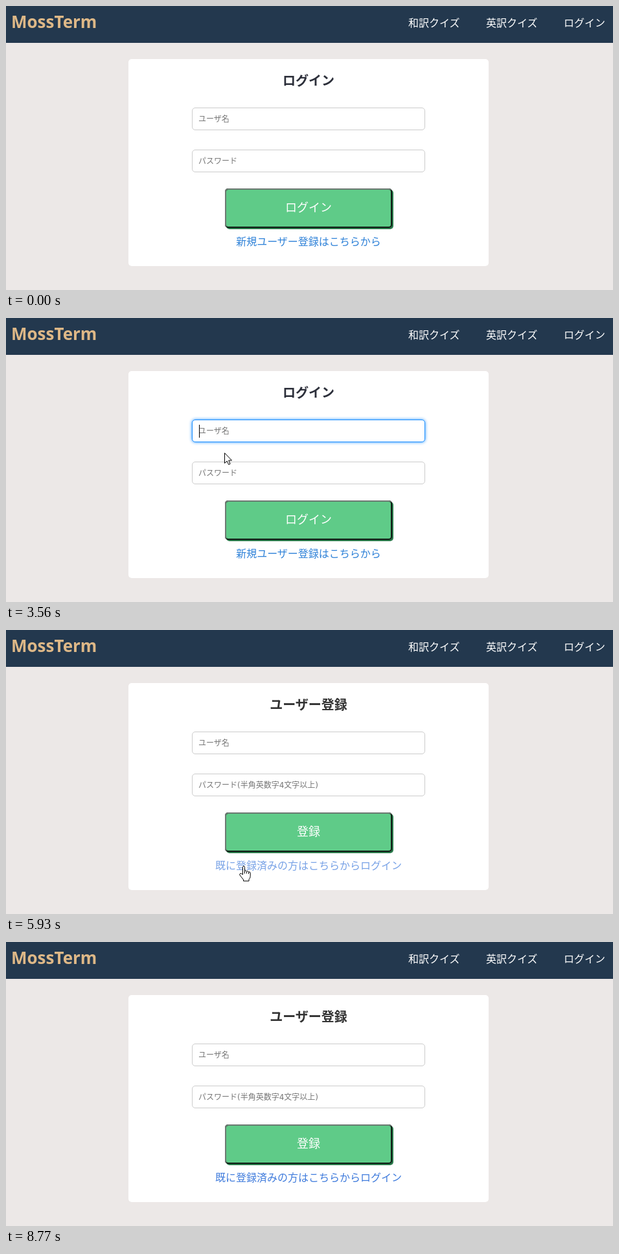
Write an HTML page that moves like this. It is 937 by 439 pixels and loops after 8840 ms.

```html
<!DOCTYPE html>
<html lang="ja">
<head>
<meta charset="utf-8">
<title>ログイン</title>
<style>
html, body { margin: 0; width: 100%; height: 100%; overflow: hidden; }
svg { display: block; width: 937px; height: 439px; background: #ece8e7;
  font-family: "DejaVu Sans", "Noto Sans CJK JP", "Noto Sans CJK", sans-serif; font-size: 16px; }
.brand { font: bold 26px "Noto Sans", "Open Sans", sans-serif; fill: #deb887; }
.nav { fill: #fff; }
.mid { text-anchor: middle; }
.heading { font-size: 20px; font-weight: bold; }
.hint { font-size: 12px; fill: #757575; }
.submit { font-size: 18px; fill: #fff; }
.box { fill: #fff; stroke: #ccc; }
.focus .box { stroke: #1e90ff; filter: drop-shadow(0 0 2.5px #1e90ff); }
.caret { fill: #000; visibility: hidden; }
</style>
</head>
<body>
<svg viewBox="0 0 937 439">
  <rect width="937" height="57" fill="#23384e"/>
  <text class="brand" x="8" y="34">MossTerm</text>
  <g class="nav">
    <text x="621" y="32">和訳クイズ</text>
    <text x="741" y="32">英訳クイズ</text>
    <text x="861" y="32">ログイン</text>
  </g>

  <rect x="189" y="82" width="556" height="320" rx="5" fill="#fff"/>
  <text id="heading" class="mid heading" x="467" y="122.5"></text>

  <g class="field" transform="translate(287 157)">
    <rect class="box" x=".5" y=".5" width="359" height="34" rx="4.5"/>
    <text class="hint" x="10" y="22">ユーザ名</text>
    <rect class="caret" x="11" y="8" width="1" height="20"/>
  </g>
  <g class="field" transform="translate(287 222)">
    <rect class="box" x=".5" y=".5" width="359" height="34" rx="4.5"/>
    <text class="hint" id="passHint" x="10" y="22"></text>
    <rect class="caret" x="11" y="8" width="1" height="20"/>
  </g>

  <rect x="340" y="284" width="258" height="61" rx="5" fill="#2a7a4b"/>
  <rect x="339" y="283" width="256" height="59" rx="4" fill="#5fcb88" stroke="#101a14" stroke-width="2"/>
  <path d="M340 341.2Q339 340 339 338V287Q339 283 343 283H591Q593 283 594.2 284" fill="none" stroke="#6c7a72" stroke-width="2"/>
  <text id="submit" class="mid submit" x="467" y="318"></text>
  <text id="link" class="mid" x="467" y="370"></text>

  <circle id="halo" r="12" fill="#ffee3a" opacity=".85" style="mix-blend-mode:multiply"/>
  <g id="cursor">
    <path id="arrow" d="M.5 .7V16.5L4.2 13.1 6.7 18.6 9.1 17.5 6.7 12.1H11.5Z" fill="#fff" stroke="#000"/>
    <path id="beam" d="M-1 -7.5H1.5M2.5 -7.5H5M2 -7V7M-1 7.5H1.5M2.5 7.5H5" fill="none" stroke="#111"/>
    <path id="hand" transform="translate(-1 -.5)" fill="#fff" stroke="#000" stroke-linejoin="round"
      d="M.5 13.5V2Q.5 .5 2 .5T3.5 2V8Q5.5 6.6 6.5 8.6 8.6 7.4 9.5 9.5 12.2 8.7 12.2 11.5V16Q12.2 19 10 21V23.5H1.5V21.5L-4 14.5Q-5 12.5 -3.2 11.8 -2 11.4 .5 13.5ZM3.5 8V12M6.5 9V12M9.5 9.8V12.5"/>
  </g>
</svg>
<script>
const LOOP = 8840, STEP = 70, BLINK = 530, HALO = 125, PAGE_TURN = 5200;

const smooth = k => k * k * (3 - 2 * k);
const steady = k => k;

// Each glide leaves from where the previous one stopped and bends toward `via`.
const glides = [
  { from: 860, to: 1840, via: [430, 425], end: [266, 365], ease: steady },
  { from: 1970, to: 2600, via: [272, 290], end: [337, 181] },
  { from: 3210, to: 4040, via: [337, 222], end: [335, 231] },
  { from: 4100, to: 4450, via: [315, 300], end: [281, 351] },
  { from: 4450, to: 4790, via: [300, 371], end: [366, 371] },
  { from: 5860, to: 6280, via: [366, 330], end: [301, 260] },
  { from: 6280, to: 6770, via: [301, 200], end: [355, 165] },
  { from: 6910, to: 7330, via: [357, 200], end: [356, 229] },
  { from: 7650, to: 8490, via: [870, 225], end: [896, 445], ease: steady }
];
glides.forEach((g, i) => g.start = i ? glides[i - 1].end : [720, 430]);

// A click focuses a field, or clears the focus when none is named.
const clicks = [
  { at: 3160, field: 0 }, { at: 4040, field: 1 }, { at: 5060 },
  { at: 6850, field: 0 }, { at: 7330, field: 1 }, { at: 8770 }
];

const pages = [
  { heading: "ログイン", passHint: "パスワード", submit: "ログイン", link: "新規ユーザー登録はこちらから",
    ink: "#2c2f3a", linkInk: "#2f82d8" },
  { heading: "ユーザー登録", passHint: "パスワード(半角英数字4文字以上)", submit: "登録",
    link: "既に登録済みの方はこちらからログイン", ink: "#333", linkInk: "#3f7bdc" }
];

const el = id => document.getElementById(id);
const fields = [...document.querySelectorAll(".field")];
const show = (node, on) => node.style.visibility = on ? "visible" : "hidden";
const within = (v, a, b) => v >= a && v < b;
const latest = (list, test) => list.filter(test).pop();

function position(t) {
  const g = latest(glides, g => g.from + STEP <= t || (g.from <= t && g.from === 4450));
  if (!g) return null;
  const stepped = Math.floor((t - g.from) / STEP) * STEP;
  const k = (g.ease || smooth)(Math.min(1, stepped / (g.to - g.from)));
  return g.end.map((end, axis) => Math.round(
    (1 - k) ** 2 * g.start[axis] + 2 * k * (1 - k) * g.via[axis] + k * k * end));
}

function pointerKind([x, y], page) {
  const overField = within(x, 287, 647) && (within(y, 157, 192) || within(y, 222, 257));
  if (overField) return "beam";
  const overLink = Math.abs(x - 467) < page.link.length * 8 && within(y, 352, 377);
  return overLink ? "hand" : "arrow";
}

function render(t) {
  const page = pages[t < PAGE_TURN ? 0 : 1];
  for (const id of ["heading", "passHint", "submit", "link"])
    if (el(id).textContent !== page[id]) el(id).textContent = page[id];
  el("heading").setAttribute("fill", page.ink);

  const pos = position(t);
  const visible = pos && pos[1] < 439;
  const kind = visible && pointerKind(pos, page);
  for (const id of ["arrow", "beam", "hand"]) show(el(id), id === kind);
  if (pos)
    for (const id of ["cursor", "halo"]) el(id).setAttribute("transform", `translate(${pos})`);
  el("link").setAttribute("fill", page.linkInk);
  el("link").setAttribute("opacity", kind === "hand" ? 0.7 : 1);

  const click = latest(clicks, c => c.at <= t);
  const age = click ? t - click.at : Infinity;
  show(el("halo"), visible && age < HALO);
  fields.forEach((field, i) => {
    const on = !!click && click.field === i;
    field.classList.toggle("focus", on);
    show(field.querySelector(".caret"), on && Math.floor(age / BLINK) % 2 === 0);
  });
}

const began = performance.now();
function tick() {
  render((performance.now() - began) % LOOP);
  requestAnimationFrame(tick);
}
tick();
</script>
</body>
</html>
```
